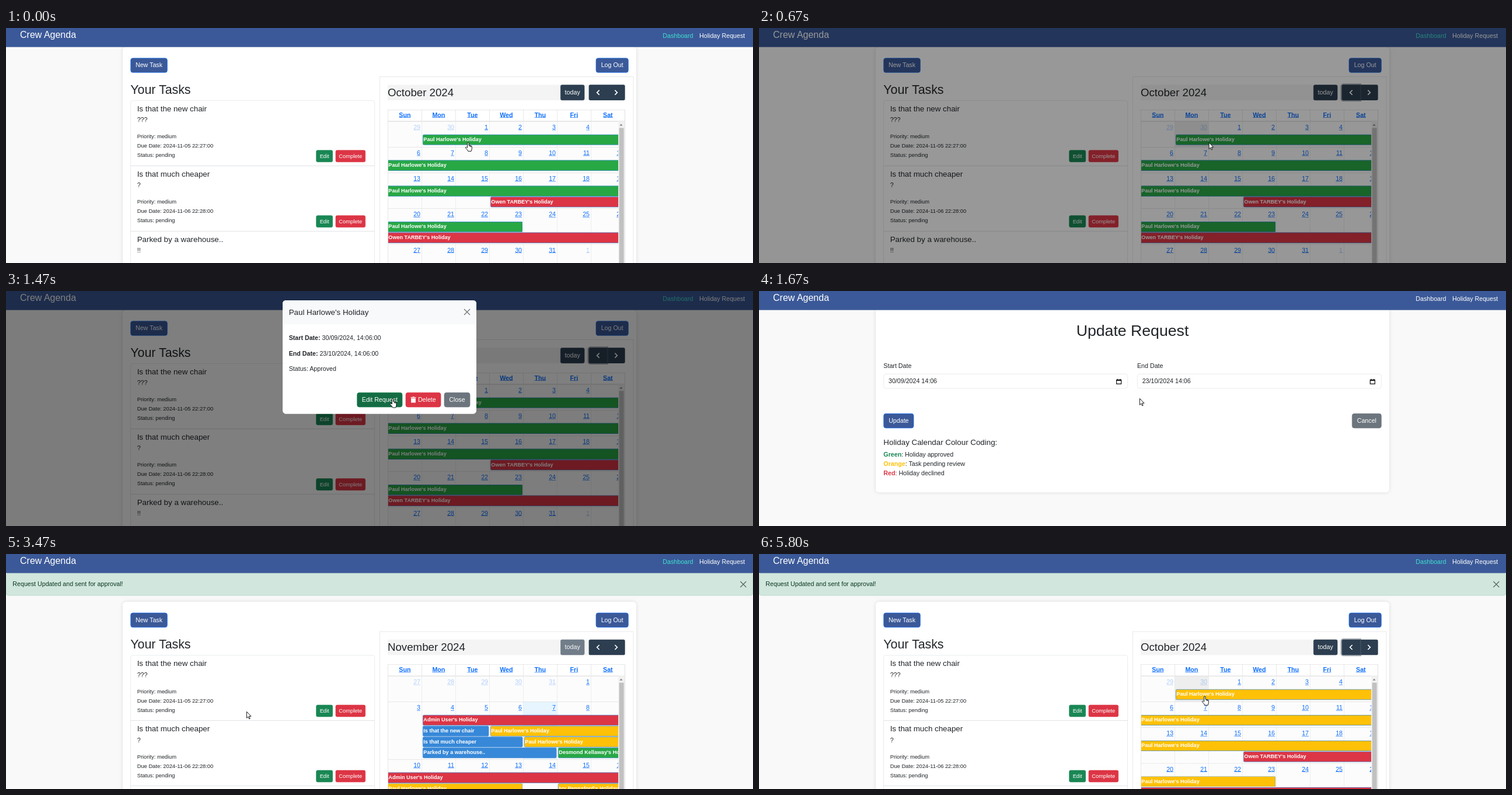
Animation, 1280 px wide and 403 px high, one loop 6.8 s. Source, as an HTML page:

```html
<!DOCTYPE html>
<html lang="en">
<head>
<meta charset="utf-8">
<title>Holiday planner</title>
<style>
html, body { margin: 0; width: 100%; height: 100%; overflow: hidden; background: #f9f9f9; }
/* Laid out on a 1920 pixel page, shown at two thirds */
#stage { width: 1920px; height: 605px; overflow: hidden; left: 0; top: 0;
  transform: scale(.666667); transform-origin: 0 0; }
div { position: absolute; box-sizing: border-box; white-space: nowrap; line-height: 24px;
  font-family: "Liberation Sans", Arial, sans-serif; font-size: 16px; color: #212529; }
svg { position: absolute; overflow: visible; fill: none; transform: scale(1.5); transform-origin: 0 0; }
.layer { left: 0; top: 0; width: 1920px; height: 780px; }
.card { background: #fff; border-radius: 8px; box-shadow: 0 0 10px rgba(0,0,0,.12); }
.btn { color: #fff; text-align: center; border: 1px solid; border-radius: 6px; }
.link { color: #0d6efd; text-decoration: underline; }
.event { color: #fff; font-weight: bold; font-size: 13.6px; border: 1px solid #3788d8; padding-left: 1px; overflow: hidden; }
</style>
</head>
<body>
<div id="stage"></div>
<script>
const ME = "Paul Harlowe", OTHER = "Owen TARBEY";
const GREEN = "#28a745", RED = "#dc3545", YELLOW = "#ffc107", BLUE = "#3788d8";
const NAVY = "#3b5998", SLATE = "#2c3e50", GREY = "#6c757d";

// Places are given in stage pixels, font sizes in page pixels
const px = v => Math.round(v * 1.5);
const box = (x, y, w, h, css = "", inner = "", attrs = "") =>
  `<div ${attrs} style="left:${px(x)}px;top:${px(y)}px;width:${px(w)}px;height:${px(h)}px;${css}">${inner}</div>`;
// y is the middle of the line
const text = (x, y, s, size = 16, css = "", attrs = "") =>
  `<div ${attrs} style="left:${px(x)}px;top:${px(y - 8)}px;font-size:${size}px;${css}">${s}</div>`;
const icon = (x, y, d, css) => `<svg style="left:${x * 1.5}px;top:${y * 1.5}px" width="1" height="1"><path d="${d}" style="${css}"/></svg>`;
const button = (x, y, w, label, color, { h = 25.33, size = 16, edge = color, id = "", radius = 6 } = {}) =>
  box(x, y, w, h, `background:${color};border-color:${edge};border-radius:${radius}px;line-height:${px(h) - 2}px;font-size:${size}px`,
    label, `class="btn" id="${id}"`);
const cross = (x, y) => icon(x, y, "M-5-5 5 5M5-5-5 5", "stroke:#000;stroke-width:1.3;opacity:.55");
const layer = (id, inner) => `<div class="layer" id="${id}">${inner}</div>`;

// Task list
const small = { h: 20.67, size: 14, radius: 4 };
const task = (i, title, note, due) => {
  const y = 124 + 112 * i;
  return box(213.33, y, 418.67, 112.67, `border:1px solid #dee2e6;border-radius:${i ? 0 : "6px 6px 0 0"}`) +
    text(224.67, y + 14, title, 20) + text(224.67, y + 34.33, note) +
    ["Priority: medium", "Due Date: " + due, "Status: pending"]
      .map((s, k) => text(224.67, y + 61.67 + 16 * k, s, 14)).join("") +
    button(531, y + 85.33, 28.5, "Edit", "#198754", small) +
    button(564.5, y + 85.33, 51, "Complete", RED, small);
};
const titles = ["Is that the new chair", "Is that much cheaper", "Parked by a warehouse.."];

// Calendar
const col = i => 654.67 + 58 * i;
const days = (month, start, tops) => tops.map((y, r) => [..."0123456"].map((_, i) => {
  const d = new Date(2024, month - 1, start + 7 * r + i), inside = d.getMonth() === month;
  const today = month === 10 && inside && d.getDate() === 7;
  const id = month === 9 && r === 0 && i === 1 ? 'id="hovered"' : "";
  return box(col(i), y, 58, (tops[r + 1] || 470) - y,
    `border:solid #ddd;border-width:1px 1px 0 0;background:${today ? "#e6f5ff" : "#fcfcfc"}`, "", id) +
    box(col(i), y + 2.67, 55.33, 16, `text-align:right;opacity:${inside ? 1 : .3}`, d.getDate(), 'class="link"');
}).join("")).join("");
const event = (rowTop, slot, from, to, label, color) => {
  const starts = from > 0, ends = to < 7;
  const left = col(from) + (starts ? 1.33 : 0), right = col(to) - (ends ? 1.33 : 0);
  const a = starts ? "3px" : 0, b = ends ? "3px" : 0;
  return box(left, rowTop + 22.67 + 18.67 * slot, right - left, 18,
    `background:${color};border-radius:${a} ${b} ${b} ${a};border-left-width:${starts ? 1 : 0}px`, label, 'class="event"');
};
const holiday = name => name + "'s Holiday";
const mine = (y, slot, from, to, color = "var(--mine)") => event(y, slot, from, to, holiday(ME), color);

const october = days(9, 29, [160, 204, 248, 309.33, 370.67]) +
  mine(160, 0, 1, 7) + mine(204, 0, 0, 7) + mine(248, 0, 0, 7) + mine(309.33, 0, 0, 4) +
  event(248, 1, 3, 7, holiday(OTHER), RED) + event(309.33, 1, 0, 7, holiday(OTHER), RED);
const november = days(10, 27, [160, 204, 302.67]) +
  event(204, 0, 1, 7, holiday("Admin User"), RED) + event(302.67, 0, 0, 7, holiday("Admin User"), RED) +
  titles.map((s, i) => event(204, i + 1, 1, i + 3, s, BLUE)).join("") +
  mine(204, 1, 3, 7, YELLOW) + mine(204, 2, 4, 7, YELLOW) +
  event(204, 3, 5, 7, holiday("Desmond Kellaway"), GREEN) +
  mine(302.67, 1, 0, 4, YELLOW) + event(302.67, 1, 5, 7, holiday("Ivy Pennaford"), YELLOW);

const chevron = "stroke:#fff;stroke-width:1.7";
const calendar =
  box(640, 83.33, 435, 400, "border:1px solid #ddd") +
  box(654, 97.33, 406.67, 26.67, "background:#f4f4f4") +
  text(654, 110.67, "", 28, "", 'id="month"') +
  button(950, 97.33, 41, "today", SLATE, { h: 26.67, id: "today", radius: 4 }) +
  box(1030, 97.33, 30.67, 26.67, `background:${SLATE};border-radius:0 4px 4px 0`) +
  box(998.67, 97.33, 31.33, 26.67, `background:${SLATE};border-radius:4px 0 0 4px`, "", 'id="prev"') +
  icon(1014.5, 110.67, "M2-4-2 0 2 4", chevron) + icon(1045, 110.67, "M-2-4 2 0-2 4", chevron) +
  box(0, 0, 1049.33, 500, "overflow:hidden", layer("oct", october) + layer("nov", november)) +
  box(1049.33, 160, 11, 330, "background:#f1f1f1") + box(1050.67, 171.33, 8, 300, "background:#c1c1c1") +
  icon(1054.3, 166, "M-2.5 1.5H2.5L0-1.5Z", "fill:#7f7f7f") +
  box(654, 140, 406.67, 340, "border:1px solid #ddd") +
  ["Sun", "Mon", "Tue", "Wed", "Thu", "Fri", "Sat"].map((d, i) =>
    box(col(i), 140, 58, 20, "border:solid #ddd;border-width:0 1px 1px 0;font-weight:bold;text-align:center;line-height:28px", d, 'class="link"')).join("");

const dashboard = box(200, 32.67, 880, 480, "", "", 'class="card"') +
  button(213.33, 51.33, 63.33, "New Task", NAVY, { edge: "#0d6efd" }) +
  button(1010.67, 51.33, 56, "Log Out", NAVY, { edge: "#0d6efd" }) +
  text(213.33, 105.33, "Your Tasks", 32) +
  task(0, titles[0], "???", "2024-11-05 22:27:00") +
  task(1, titles[1], "?", "2024-11-06 22:28:00") +
  task(2, titles[2], "!!", "2024-11-07 22:28:00") + calendar;

// Request form
const field = (x, label, value) => text(x, 128.67, label) +
  box(x, 142, 418.67, 25.33, "border:1px solid #dee2e6;border-radius:6px;background:#fff") +
  text(x + 8.67, 154.67, value) +
  icon(x + 403.5, 155, "M-4-3H4V4H-4ZM-4-2H4M-2.3-4.5V-3M2.3-4.5V-3", "stroke:#111;stroke-width:1.2");
const key = (y, color, name, meaning) =>
  text(213.33, y, `<b style="color:${color}">${name}</b>: ${meaning}`);
const form = box(200, 28, 880, 317.33, "", "", 'class="card"') +
  box(200, 59.33, 880, 16, "text-align:center;font-size:40px", "Update Request") +
  field(213.33, "Start Date", "30/09/2024 14:06") + field(648, "End Date", "23/10/2024 14:06") +
  button(213.33, 210, 52, "Update", NAVY, { edge: "#0d6efd", id: "update" }) +
  button(1016, 210, 50.67, "Cancel", GREY) +
  text(213.33, 259.33, "Holiday Calendar Colour Coding:", 20) +
  key(280.67, "#198754", "Green", "Holiday approved") +
  key(296.67, YELLOW, "Orange", "Task pending review") +
  key(312.67, RED, "Red", "Holiday declined");

const nav = box(0, 0, 1280, 32.67, `background:${NAVY}`) +
  text(24, 11.67, "Crew Agenda", 24, "color:#fff") +
  text(1125.33, 14, "Dashboard", 16, "", 'id="home"') +
  text(1188.33, 14, "Holiday Request", 16, "color:#fff");
const alertBar = box(0, 32.67, 1280, 38.67, "background:#d1e7dd;border:1px solid #a3cfbb;border-radius:6px") +
  text(11.33, 52, "Request Updated and sent for approval!", 16, "color:#0a3622") + cross(1263, 52);
const modal = box(474, 7, 332, 194.67, "background:#fff;border-radius:8px") +
  box(474, 7, 332, 41, "background:#f8f9fb;border-radius:8px 8px 0 0") +
  text(484.67, 28, holiday(ME), 20) + cross(790, 27.5) +
  text(484.67, 72, "<b>Start Date:</b> 30/09/2024, 14:06:00") +
  text(484.67, 98.67, "<b>End Date:</b> 23/10/2024, 14:06:00") +
  text(484.67, 125.33, "Status: Approved") +
  button(601, 165.33, 78, "Edit Request", "#198754", { id: "edit" }) +
  button(684.67, 165.33, 60.67, '<span style="padding-left:19px">Delete</span>', RED, { id: "remove" }) +
  icon(698, 178, "M-4.5-4H4.5M-1.5-4.8H1.5M-3.2-2V4.3H3.2V-2Z", "stroke:#fff;stroke-width:1.3;fill:#fff") +
  button(750.67, 165.33, 44.67, "Close", GREY);
const pen = "fill:#fff;stroke:#000;stroke-width:.9;stroke-linejoin:round";
const cursor =
  `<div id="arrow">${icon(0, 0, "M.4.4V11.4L2.9 9 4.6 12.8 6.2 12.1 4.6 8.3H8Z", pen)}</div>` +
  `<div id="hand">${icon(-5, 0, "M4 9.5V1.7a1.2 1.2 0 0 1 2.4 0V5.8L10.2 6.7Q11.7 7.1 11.6 8.7V11.5Q11.5 13.5 10.4 16H5.2Q4 13.2 1 10.6Q.2 9.1 1.6 8.7 2.6 8.6 4 10ZM8.2 6.3V8.5M10 6.8V8.8", pen)}</div>`;

document.getElementById("stage").innerHTML = layer("dash", dashboard) + layer("form", form) +
  layer("alert", alertBar) + nav + box(0, 0, 1280, 404, "background:#000", "", 'id="shade"') +
  layer("modal", modal) + cursor;

// Motion
const path = [
  [0, 791, 195], [70, 791, 195], [330, 771, 196], [1010, 770, 196], [1130, 732, 187], [1330, 662, 184],
  [1470, 662, 184], [1530, 652, 184], [2070, 652, 184], [2400, 430, 222], [2600, 266, 236], [2730, 236, 217],
  [3270, 236, 217], [3800, 700, 356], [4070, 700, 356], [4530, 928, 190], [4800, 1014, 168], [4870, 1014, 168],
  [5130, 1012, 160], [5250, 1012, 160], [5800, 763, 243], [6800, 763, 243]
];
const within = (t, a, b) => t >= a && t < b;
const ramp = (t, a, b) => Math.min(1, Math.max(0, (t - a) / (b - a)));
const pointer = t => {
  const i = path.findIndex(p => p[0] > t), [a, x, y] = path[i - 1], [b, x2, y2] = path[i];
  const k = ramp(t, a, b);
  return [x + (x2 - x) * k, y + (y2 - y) * k];
};
const $ = id => document.getElementById(id).style;
const show = (id, on) => $(id).display = on ? "block" : "none";

function render(t) {
  const onForm = within(t, 1670, 3270), updated = t >= 3270, inNov = within(t, 3270, 5270);
  show("dash", !onForm);
  show("form", onForm);
  show("alert", updated);
  show("oct", !inNov);
  show("nov", inNov);
  $("dash").top = updated ? "74px" : 0;
  $("dash").setProperty("--mine", updated ? YELLOW : GREEN);
  $("home").color = onForm ? "#fff" : "#40e0d0";
  $("today").opacity = inNov ? .65 : 1;
  document.getElementById("month").textContent = inNov ? "November 2024" : "October 2024";
  $("prev").boxShadow = within(t, 470, 1670) || t >= 5000 ? "0 0 0 3px rgba(76,91,106,.5)" : "none";
  $("prev").background = within(t, 4800, 5330) ? "#1e2b37" : SLATE;

  const hover = updated ? ramp(t, 5600, 5800) : ramp(t, 70, 330);
  const shade = 252 - 14 * hover;
  $("hovered").background = `rgb(${shade},${shade},${shade})`;

  show("shade", t < 1670);
  $("shade").opacity = .5 * ramp(t, 550, 700);
  show("modal", within(t, 706, 1670));
  $("modal").opacity = ramp(t, 706, 856);
  $("modal").top = 13 - 50 * (1 - ramp(t, 706, 1006)) ** 1.7 + "px";
  $("remove").background = within(t, 1100, 1230) ? "#bb2d3b" : RED;
  $("edit").background = t >= 1470 ? "#146c43" : t >= 1260 ? "#157347" : "#198754";
  $("update").background = t >= 2650 ? "#0b5ed7" : NAVY;

  const hand = t < 470 || within(t, 1130, 1670) || within(t, 2650, 2800) || within(t, 4740, 5310) || t >= 5700;
  const [x, y] = pointer(t);
  show("hand", hand);
  show("arrow", !hand);
  for (const id of ["hand", "arrow"]) {
    $(id).left = px(x) + "px";
    $(id).top = px(y) + "px";
  }
}
function tick() {
  render(performance.now() % 6800);
  requestAnimationFrame(tick);
}
tick();
</script>
</body>
</html>
```
